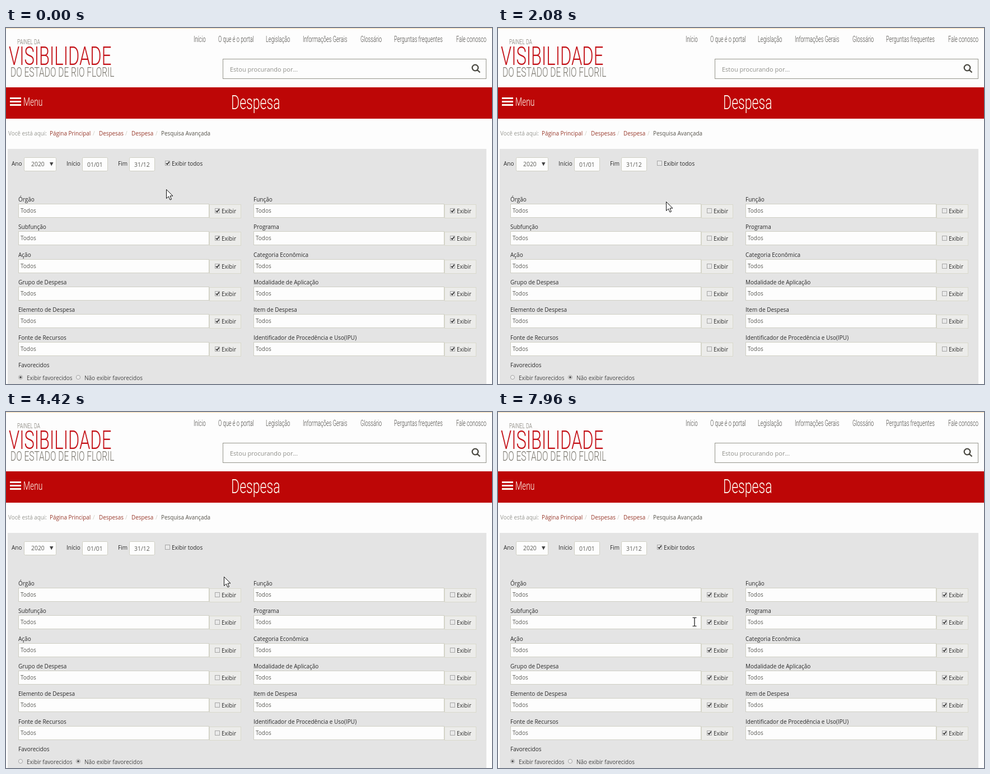
These frames come from a looping animation (868x636 px, 8 s). An HTML page with a canvas:

```html
<!DOCTYPE html>
<html lang="pt-BR">
<head>
<meta charset="utf-8">
<title>Despesa</title>
<style>
html, body { margin: 0; width: 100%; height: 100%; overflow: hidden; background: #fdfdfd; }
canvas { display: block; }
</style>
</head>
<body>
<canvas id="stage" width="868" height="636"></canvas>
<script>
const ctx = document.getElementById('stage').getContext('2d');
const LOOP = 8000;
const CONDENSE = 0.66; // one narrow display face for logo, nav and headings
const C = {
  page: '#fdfdfd', panel: '#e4e4e4', addon: '#ececea', edge: '#cfcfc4',
  red: '#bd0606', pale: '#fffdf2', dark: '#2b2b2b', value: '#5a5a55',
  link: '#98392b', soft: '#999993'
};

const LEFT = ['Órgão', 'Subfunção', 'Ação', 'Grupo de Despesa', 'Elemento de Despesa', 'Fonte de Recursos'];
const RIGHT = ['Função', 'Programa', 'Categoria Econômica', 'Modalidade de Aplicação', 'Item de Despesa',
  'Identificador de Procedência e Uso(IPU)'];
const NAV = [['Início', 335], ['O que é o portal', 379], ['Legislação', 464], ['Informações Gerais', 530],
  ['Glossário', 633], ['Perguntas frequentes', 693], ['Fale conosco', 804]];
const CRUMBS = [['Você está aqui:', 4, C.soft], ['Página Principal', 78, C.link], ['/', 155, C.edge],
  ['Despesas', 166, C.link], ['/', 213, C.edge], ['Despesa', 224, C.link], ['/', 267, C.edge],
  ['Pesquisa Avançada', 277, '#55524a']];

// Pointer path: time, x, y
const PATH = [
  [0, 286, 288], [130, 286, 288], [830, 290, 243], [1710, 290, 243], [2080, 300, 310],
  [2250, 312, 346], [2500, 312, 346], [2900, 375, 304], [3290, 365, 349], [3380, 365, 346],
  [3720, 384, 388], [4150, 380, 309], [4420, 389, 294], [4830, 403, 320], [5040, 403, 320],
  [5330, 286, 260], [5580, 290, 243], [7290, 290, 243], [7960, 351, 375], [LOOP, 351, 375]
];

const ARROW = new Path2D('M.5 .5V16.5L4.3 13L7 19L9.5 18L7 12H12Z');
const HAND = new Path2D('M-1.5 1Q-1.5-.5 0-.5T1.7 1V7L4 6.6 5 8 7.4 7.6 8.2 9 10.3 9.4V16L8.3 20V23H-1V20' +
  'L-5.8 13.5Q-6.5 11-4 11.2L-1.5 14Z');

function text(str, x, y, color = C.dark, size = 10, weight = 400) {
  ctx.font = `${weight} ${size}px "Open Sans", "Noto Sans", sans-serif`;
  ctx.fillStyle = color;
  ctx.fillText(str, x, y);
}

function label(str, x, y) {
  text(str, x, y, C.dark, 10, 500);
}

function display(str, x, y, size, color, weight = 300) {
  ctx.save();
  ctx.translate(x, y);
  ctx.scale(CONDENSE, 1);
  ctx.font = `${weight} ${size}px Roboto, sans-serif`;
  ctx.fillStyle = color;
  ctx.fillText(str, 0, 0);
  ctx.restore();
}

function rect(x, y, w, h, fill, stroke) {
  ctx.fillStyle = fill;
  ctx.fillRect(x, y, w, h);
  if (!stroke) return;
  ctx.strokeStyle = stroke;
  ctx.lineWidth = 1;
  ctx.strokeRect(x + .5, y + .5, w - 1, h - 1);
}

function field(x, y, w, h) {
  ctx.beginPath();
  ctx.roundRect(x + .5, y + .5, w - 1, h - 1, 2);
  ctx.fillStyle = C.page;
  ctx.fill();
  ctx.strokeStyle = C.edge;
  ctx.lineWidth = 1;
  ctx.stroke();
}

function checkbox(x, y, on, pressed) {
  rect(x, y, 9, 9, pressed ? '#d2d2d2' : '#e9e9e9', '#a6a6a6');
  if (!on) return;
  ctx.strokeStyle = '#333';
  ctx.lineWidth = 1.7;
  ctx.beginPath();
  ctx.moveTo(x + 2, y + 4.5);
  ctx.lineTo(x + 4, y + 6.7);
  ctx.lineTo(x + 7.6, y + 1.8);
  ctx.stroke();
}

function dot(x, y, r, color) {
  ctx.beginPath();
  ctx.arc(x, y, r, 0, Math.PI * 2);
  ctx.fillStyle = color;
  ctx.fill();
}

function radio(x, y, on) {
  dot(x, y, 3.6, '#ededed');
  ctx.strokeStyle = '#a6a6a6';
  ctx.lineWidth = 1;
  ctx.stroke();
  if (on) dot(x, y, 2, '#555');
}

function header() {
  rect(0, 0, 868, 1, '#f9d9ac');
  display('PAINEL DA', 20, 29, 13, '#77736a');
  display('VISIBILIDADE', 5, 66, 47, '#c4141a');
  display('DO ESTADO DE RIO FLORIL', 8, 87, 23.5, '#77736a');
  for (const [name, x] of NAV) display(name, x, 25, 14, '#4a4844');

  rect(387, 55, 471, 36, C.page, '#95958c');
  text('Estou procurando por...', 400, 78, '#8f8f8a', 11);
  ctx.strokeStyle = '#4c4b44';
  ctx.lineWidth = 2.3;
  ctx.beginPath();
  ctx.arc(838, 71, 5.3, 0, Math.PI * 2);
  ctx.moveTo(842, 75);
  ctx.lineTo(846.5, 79.5);
  ctx.stroke();

  rect(0, 106, 868, 56, C.red);
  for (let i = 0; i < 3; i++) rect(7, 124 + i * 6, 20, 3, C.pale);
  display('Menu', 31, 139, 21, C.pale);
  display('Despesa', 402, 145, 35, C.pale);
  for (const [name, x, color] of CRUMBS) text(name, x, 192, color, 9.9);
}

function filters(allOn, pressed) {
  rect(3, 216, 855, 420, C.panel);
  label('Ano', 10, 246);
  field(32, 231, 58, 25);
  text('2020', 45, 247, C.value, 10.4);
  ctx.fillStyle = '#444';
  ctx.beginPath();
  ctx.moveTo(78, 240);
  ctx.lineTo(84.5, 240);
  ctx.lineTo(81.2, 246.5);
  ctx.fill();
  label('Início', 108, 246);
  field(136, 231, 46, 25);
  text('01/01', 145, 248, C.value, 10.4);
  label('Fim', 200, 246);
  field(220, 231, 46, 25);
  text('31/12', 229, 248, C.value, 10.4);
  checkbox(284, 237, allOn, pressed);
  label('Exibir todos', 296, 246);
}

function row(name, x, i, on) {
  const y = Math.round(i * 49.35);
  label(name, x, y + 310);
  rect(x + 341, y + 315, 57, 25, C.addon, '#d9d9cc');
  rect(x, y + 314, 341, 25, C.page, C.edge);
  text('Todos', x + 4, y + 330, C.value);
  checkbox(x + 351, y + 322, on);
  label('Exibir', x + 363, y + 331);
}

// Velocity at a path point; zero where the pointer rests.
function velocity(i, axis) {
  const a = PATH[i - 1], p = PATH[i], b = PATH[i + 1];
  const rests = (q) => !q || (q[1] === p[1] && q[2] === p[2]);
  return rests(a) || rests(b) ? 0 : (b[axis] - a[axis]) / (b[0] - a[0]);
}

function pointerAt(t) {
  const i = Math.max(1, PATH.findIndex(p => p[0] > t));
  const a = PATH[i - 1], b = PATH[i];
  const span = b[0] - a[0], k = (t - a[0]) / span;
  const ease = k * k * (3 - 2 * k);
  return [1, 2].map(axis => Math.round(
    a[axis] + (b[axis] - a[axis]) * ease +
    span * k * (1 - k) * ((1 - k) * velocity(i - 1, axis) - k * velocity(i, axis))
  ));
}

function overInput(x, y) {
  return x > 22 && x < 362 && y >= 314 && (y - 314) % 49.35 < 24;
}

function ibeam() {
  ctx.strokeStyle = '#111';
  ctx.lineWidth = 1.2;
  ctx.beginPath();
  ctx.moveTo(-3.5, -7.5);
  ctx.lineTo(3.5, -7.5);
  ctx.moveTo(0, -7.5);
  ctx.lineTo(0, 7.5);
  ctx.moveTo(-3.5, 7.5);
  ctx.lineTo(3.5, 7.5);
  ctx.stroke();
}

function pointer(x, y) {
  ctx.save();
  ctx.translate(x, y);
  if (overInput(x, y)) {
    ibeam();
  } else {
    const hand = x >= 283 && x <= 352 && y >= 235 && y <= 251;
    const shape = hand ? HAND : ARROW;
    ctx.fillStyle = '#fff';
    ctx.strokeStyle = '#111';
    ctx.lineWidth = 1;
    ctx.fill(shape);
    ctx.stroke(shape);
    if (hand) {
      ctx.beginPath();
      for (const px of [1.8, 4.8, 7.6]) {
        ctx.moveTo(px, 7);
        ctx.lineTo(px, 11.5);
      }
      ctx.stroke();
    }
  }
  ctx.restore();
}

function draw(t) {
  const allOn = t < 1290 || t >= 6540;
  const rowsOn = t < 1330 || t >= 6630;
  const pressed = (t >= 1080 && t < 1290) || (t >= 6170 && t < 6540);

  rect(0, 0, 868, 636, C.page);
  header();
  filters(allOn, pressed);
  LEFT.forEach((name, i) => row(name, 22, i, rowsOn));
  RIGHT.forEach((name, i) => row(name, 442, i, rowsOn));
  label('Favorecidos', 22, 606);
  radio(26, 624, rowsOn);
  text('Exibir favorecidos', 37, 629, '#484848', 9.9);
  radio(129, 624, !rowsOn);
  text('Não exibir favorecidos', 140, 629, '#484848');
  pointer(...pointerAt(t));
}

const start = performance.now();
function tick() {
  draw((performance.now() - start) % LOOP);
  requestAnimationFrame(tick);
}
tick();
</script>
</body>
</html>
```
